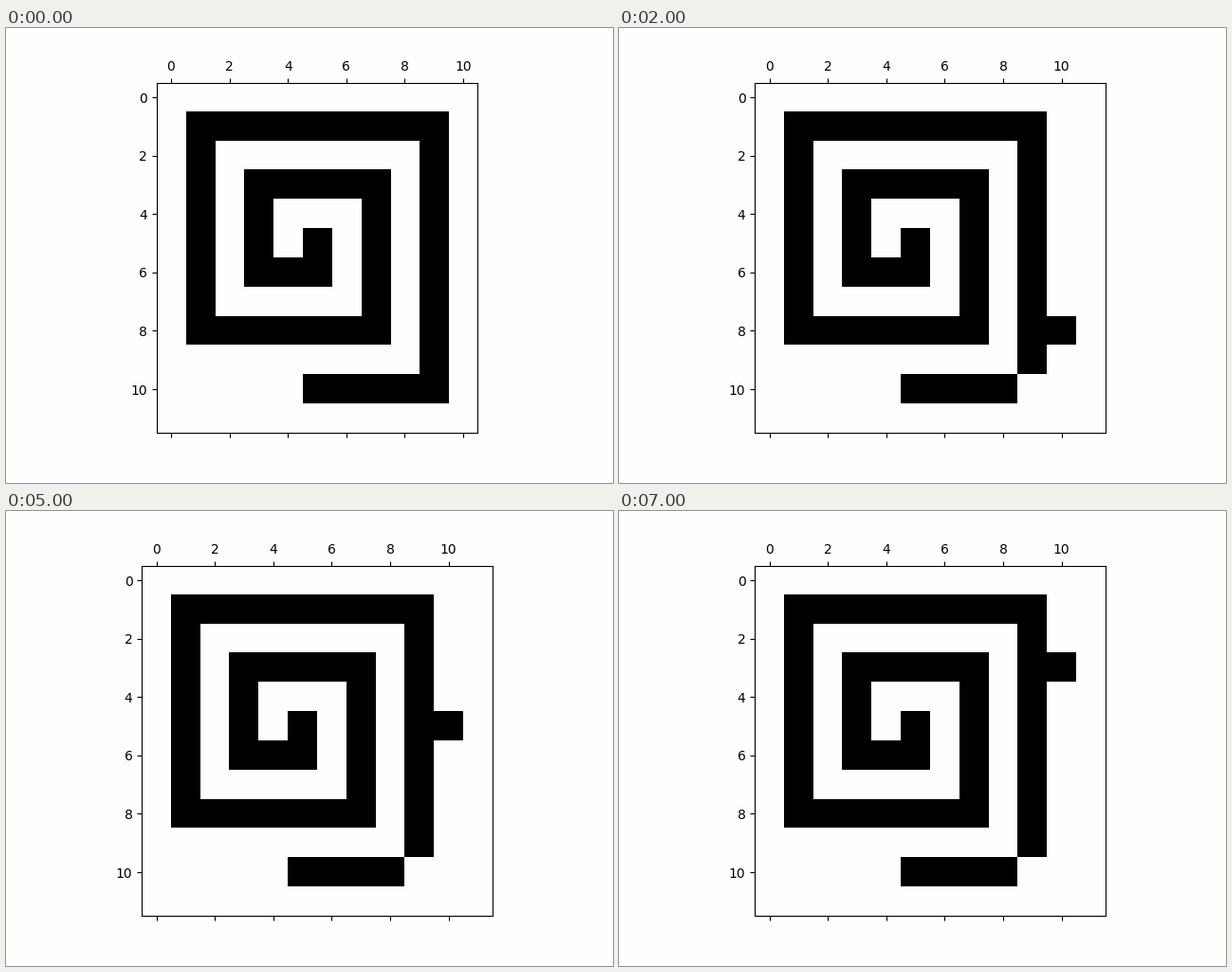
Animation, 640 px wide and 480 px high, one loop 8 s. Source, as a matplotlib script:

```python
from itertools import cycle

import matplotlib.pyplot as plt
import numpy as np
from matplotlib.animation import FuncAnimation
from matplotlib.colors import ListedColormap

ROWS = 12
STEPS = 8
WHITE = "#fefefe"
CMAP = ListedColormap([WHITE, "black"])
DOWN, LEFT, UP, RIGHT = (1, 0), (0, -1), (-1, 0), (0, 1)


def spiral(cols):
    """Walk out from the centre, each arm one cell longer, then a short tail."""
    grid = np.zeros((ROWS, cols))
    row = col = 5
    grid[row, col] = 1
    for length, (dr, dc) in zip([*range(1, 10), 4], cycle((DOWN, LEFT, UP, RIGHT))):
        for _ in range(length):
            row, col = row + dr, col + dc
            grid[row, col] = 1
    return grid


def grid_at(step):
    """The corner cell breaks off and climbs column 10, widening the grid."""
    grid = spiral(11 if step < 2 else 12)
    if step > 0:
        grid[10, 9] = 0
        grid[10 - step, 10] = 1
    return grid


fig, ax = plt.subplots(figsize=(6.4, 4.8), dpi=100, facecolor=WHITE)


def draw(step):
    ax.clear()
    ax.set_facecolor(WHITE)
    ax.matshow(grid_at(step), cmap=CMAP, vmin=0, vmax=1)
    ax.tick_params(axis="y", pad=3.47)
    return ax.images


anim = FuncAnimation(fig, draw, frames=STEPS, interval=1000,
                     repeat=True, repeat_delay=0, blit=False)
plt.show()
```
